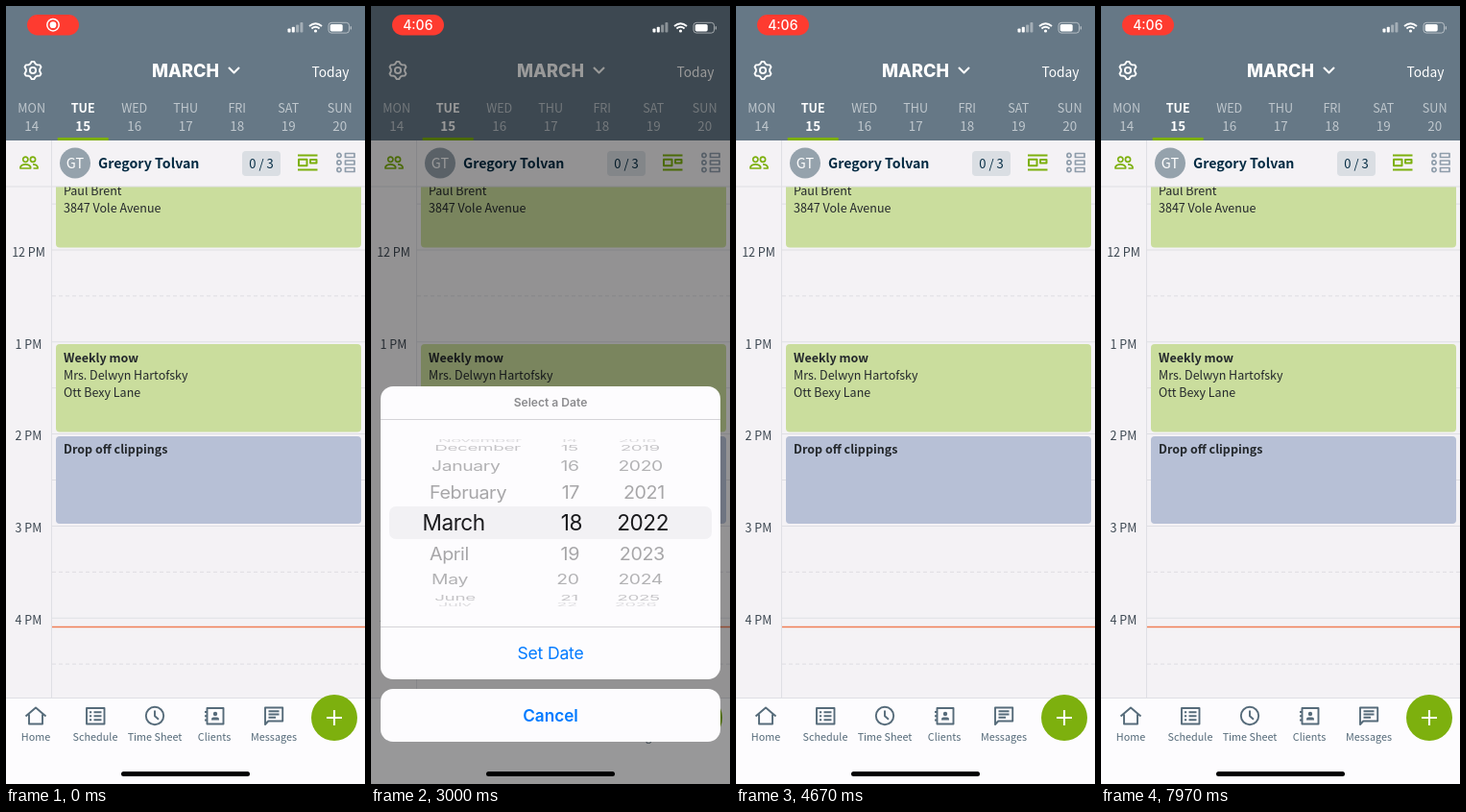
An HTML page with a canvas that plays this animation: 374 px wide and 810 px high, repeating every 8 s.

```html
<!DOCTYPE html>
<html lang="en">
<head>
<meta charset="utf-8">
<title>Schedule date picker</title>
<style>
  html, body { margin: 0; width: 100%; height: 100%; overflow: hidden; background: #f4f2f5; }
  canvas { display: block; width: 374px; height: 810px; }
</style>
</head>
<body>
<canvas id="stage"></canvas>
<script>
const W = 374, H = 810, LOOP = 8000;
const canvas = document.getElementById('stage');
const ratio = window.devicePixelRatio || 1;
canvas.width = W * ratio;
canvas.height = H * ratio;
const ctx = canvas.getContext('2d');

const APP = '"Noto Sans CJK JP", "Noto Sans CJK SC", "Noto Sans CJK", "Noto Sans", sans-serif';
const SYSTEM = 'Inter, "Liberation Sans", sans-serif';
const C = {
  header: '#667886', page: '#f4f2f5', bar: '#fdfcfe', line: '#dfdfe4', green: '#7db00e',
  navy: '#032b43', ink: '#24282c', slate: '#566b7a', muted: '#8f9dab', job: '#cadd9d',
  task: '#b7c0d6', now: '#f07f57', blue: '#007aff', red: '#fe3b30'
};
const DAYS = ['MON', 'TUE', 'WED', 'THU', 'FRI', 'SAT', 'SUN'];
const MONTHS = ['January', 'February', 'March', 'April', 'May', 'June', 'July',
  'August', 'September', 'October', 'November', 'December'];

// Timeline in ms
const T = { clock: 600, open: 1646, spin1: 2540, spin2: 3420, press: 4210, close: 4307,
  pick: 4680, today: 7050 };
const SHEET_TOP = 396, SHEET_TRAVEL = H - SHEET_TOP;

const clamp = v => Math.max(0, Math.min(1, v));
const phase = (t, start, length) => clamp((t - start) / length);
const inOutQuad = u => u < .5 ? 2 * u * u : 1 - 2 * (1 - u) ** 2;
const inOutCubic = u => u < .5 ? 4 * u ** 3 : 1 - 4 * (1 - u) ** 3;

function text(str, x, y, size, color, { weight = 400, align = 'left', font = APP, spacing = 0 } = {}) {
  ctx.font = `${weight} ${size}px ${font}`;
  ctx.letterSpacing = `${spacing}px`;
  ctx.textAlign = align;
  ctx.fillStyle = color;
  ctx.fillText(str, x, y);
}
function rect(x, y, w, h, color, r = 0) {
  ctx.fillStyle = color;
  ctx.beginPath();
  ctx.roundRect(x, y, w, h, r);
  ctx.fill();
}
function disc(x, y, r, color) {
  ctx.fillStyle = color;
  ctx.beginPath();
  ctx.arc(x, y, r, 0, 7);
  ctx.fill();
}
function stroke(d, color, width = 2) {
  ctx.strokeStyle = color;
  ctx.lineWidth = width;
  ctx.stroke(new Path2D(d));
}
function ring(x, y, r, color, width = 2) {
  stroke(`M${x - r} ${y}a${r} ${r} 0 1 0 ${2 * r} 0a${r} ${r} 0 1 0 ${-2 * r} 0Z`, color, width);
}
function clipped(x, y, w, h, draw) {
  ctx.save();
  ctx.beginPath();
  ctx.rect(x, y, w, h);
  ctx.clip();
  draw();
  ctx.restore();
}

// Six teeth, one pointing straight up
function gear(x, y) {
  let d = '';
  for (let i = 0; i < 24; i++) {
    const r = i % 4 < 2 ? 9.2 : 7.2;
    const a = (i - .5) * Math.PI / 12;
    d += `${i ? 'L' : 'M'}${x + r * Math.sin(a)} ${y - r * Math.cos(a)}`;
  }
  stroke(d + 'Z', '#fff', 1.9);
  ring(x, y, 3.1, '#fff', 1.9);
}

function header(selected, scroll) {
  rect(0, 0, W, 140, C.header);
  gear(28, 67);
  text('MARCH', 152, 74, 18.1, '#fff', { weight: 800, font: SYSTEM });
  stroke('M232 64l5.5 5.5l5.5-5.5', '#fff', 2.1);
  text('Today', 357.5, 73.5, 13.8, '#fff', { align: 'right' });
  for (let day = 13; day < 29; day++) {
    const x = 26.7 + (day - 14) * 53.5 - scroll;
    if (x < -30 || x > W + 30) continue;
    const on = day === selected;
    const style = { weight: on ? 700 : 400, align: 'center' };
    const color = on ? '#fff' : '#c0c8ce';
    text(DAYS[day % 7], x, 110.5, 12.6, color, style);
    text(day, x, 129.5, 13.4, color, style);
    if (on) rect(x - 26.5, 137, 53, 3, C.green);
  }
}

function memberRow(badge) {
  rect(0, 140, W, 48, C.page);
  rect(0, 187.5, W, 1, C.line);
  ring(20.3, 159.8, 2.6, C.green, 1.7);
  ring(28, 159.8, 2.6, C.green, 1.7);
  stroke('M15 169v-1.5q1.5-2.6 5.3-2.6t5.3 2.6v1.5ZM28 164.9q3.8 0 5 2.6v1.5h-4.5', C.green, 1.7);
  disc(72, 163.5, 16, '#95a2ac');
  text('GT', 72, 169, 14.5, '#fff', { align: 'center' });
  text('Gregory Tolvan', 96, 168.5, 14.2, C.navy, { weight: 700 });
  const w = badge.length > 1 ? 40 : 23;
  rect(286 - w, 151, w, 26, '#dadee3', 4);
  text(badge, 286 - w / 2, 168.5, 13, C.navy, { align: 'center' });
  stroke('M304 155.5h20.5M304 170.5h20.5M305 159.8h8.5v6.4h-8.5ZM317 160h6.5v3.5h-6.5Z', C.green, 2);
  for (const y of [155.5, 163, 170.5]) {
    ring(347, y, 2.1, C.muted, 1.7);
    stroke(`M353.5 ${y - 2}h9.5v4h-9.5Z`, C.muted, 1.7);
  }
}

function schedule(busy) {
  rect(0, 140, W, 581, C.page);
  clipped(0, 188, W, 532, () => {
    for (let i = 0; i < 6; i++) {
      const y = 254 + 95.8 * i;
      rect(48, y - .5, W, 1, C.line);
      ctx.setLineDash([4, 3]);
      stroke(`M48 ${y - 47.9}H374`, '#dedde2', 1);
      ctx.setLineDash([]);
      text(`${i ? i : 12} PM`, 23.5, y + 6.7, 12.5, '#3b4650', { align: 'center' });
    }
    if (!busy) return;
    const line = (str, y, weight) => text(str, 60, y, 12.5, C.ink, { weight });
    rect(52, 160, 318, 91.5, C.job, 4);
    line('Paul Brent', 196.5);
    line('3847 Vole Avenue', 214.5);
    rect(52, 352, 318, 91.5, C.job, 4);
    line('Weekly mow', 370.5, 700);
    line('Mrs. Delwyn Hartofsky', 388.5);
    line('Ott Bexy Lane', 406.5);
    rect(52, 448, 318, 91, C.task, 4);
    line('Drop off clippings', 466, 700);
    rect(48, 645.8, W, 1.4, C.now);
  });
  rect(47, 140, 1, 581, C.line);
}

function tabBar() {
  rect(0, 720, W, 90, C.bar);
  rect(0, 720, W, 1, C.line);
  const icon = d => stroke(d, C.slate, 1.9);
  icon('M20.5 739.5L31 730.5l10.5 9M24 737.5v10h14v-10');
  icon('M84 731h18.5v16.5H84ZM87 735.3h2.2M91.5 735.3h8M87 739.3h2.2M91.5 739.3h8M87 743.3h2.2M91.5 743.3h8');
  ring(155, 739, 9.2, C.slate, 1.9);
  icon('M155 733.5v5.8l4 3.4');
  icon('M209.5 731h17v16.5h-17ZM207 735h3M207 739.3h3M207 743.5h3');
  disc(218, 737, 2.2, C.slate);
  rect(214, 740.5, 8, 3, C.slate, [2, 2, 0, 0]);
  icon('M270 748v-17.5h18.2v14h-15ZM273.5 734.3h11M273.5 737.5h11M273.5 740.7h7.5');
  ['Home', 'Schedule', 'Time Sheet', 'Clients', 'Messages'].forEach((label, i) =>
    text(label, 31 + 62 * i, 765, 10.8, C.slate, { align: 'center' }));
  disc(342, 741, 24, C.green);
  stroke('M334 741h16M342 733v16', '#fff', 2.1);
}

// Rows lie on a cylinder; the middle band shows them enlarged.
function wheel(cy, day) {
  const columns = [
    { value: 2, edge: 60.3, midEdge: 53.5, align: 'left', label: i => MONTHS[(i + 12) % 12] },
    { value: day, edge: 217.2, midEdge: 220, align: 'right', label: i => i },
    { value: 2022, edge: 306.5, midEdge: 310, align: 'right', label: i => i }
  ];
  const rows = mid => {
    for (const col of columns) {
      const nearest = Math.round(col.value);
      for (let i = nearest - 4; i <= nearest + 4; i++) {
        const angle = (i - col.value) * .3805, cos = Math.cos(angle);
        if (cos < .02 || (mid && Math.abs(i - col.value) > 1.2)) continue;
        const size = mid ? 22.6 : 19.8, scale = 1 - .08 * (1 - cos);
        ctx.save();
        ctx.translate(187, cy + 86 * Math.sin(angle));
        ctx.scale(scale, Math.max(cos, .22));
        text(col.label(i), (mid ? col.midEdge : col.edge) - 187, size * .36, size,
          mid ? '#1b1b1e' : `rgba(30,30,34,${.13 + .28 * cos})`,
          { align: col.align, font: SYSTEM, spacing: -.02 * size });
        ctx.restore();
      }
    }
  };
  clipped(10, cy - 87, 354, 70, () => rows(false));
  clipped(10, cy + 17, 354, 70, () => rows(false));
  clipped(10, cy - 17, 354, 34, () => rows(true));
}

function dateSheet(top, day, pressed) {
  const centered = { align: 'center', font: SYSTEM };
  rect(10, top, 354, 305, '#fdfcfe', 13);
  text('Select a Date', 187, top + 21.2, 12.1, '#8b8b8e', { ...centered, weight: 600 });
  rect(10, top + 34, 354, 1, '#d5d4d8');
  rect(19, top + 125, 336, 34, '#f2f1f4', 7);
  wheel(top + 142, day);
  rect(10, top + 250, 354, 1, '#d5d4d8');
  text('Set Date', 187, top + 284.2, 17.6, pressed ? '#7fbce9' : C.blue, { ...centered, spacing: -.2 });
  rect(10, top + 315, 354, 55, '#fdfcfe', 13);
  text('Cancel', 187, top + 349, 17.2, C.blue, { ...centered, weight: 600 });
}

function statusBar(t) {
  rect(22, 9, 54, 21.5, C.red, 11);
  if (t < T.clock) {
    ring(49, 19.7, 6.2, '#fff', 1.5);
    disc(49, 19.7, 3.4, '#fff');
  } else {
    text('4:06', 48.8, 24.6, 14, '#fff', { weight: 500, align: 'center', font: SYSTEM });
  }
  [4, 5.8, 8, 10.5].forEach((h, i) =>
    rect(293.5 + 4.3 * i, 27.5 - h, 3, h, i < 2 ? '#fff' : 'rgba(255,255,255,.4)', .8));
  stroke('M316 21q6.5-5.6 13 0M318.4 23.4q4.1-3.4 8.2 0', '#fff', 1.9);
  disc(322.5, 26, 1.6, '#fff');
  ctx.strokeStyle = 'rgba(255,255,255,.5)';
  ctx.lineWidth = 1;
  ctx.beginPath();
  ctx.roundRect(336, 17.3, 21.5, 10.8, 3);
  ctx.stroke();
  rect(337.7, 19, 13, 7.4, '#fff', 1.6);
  rect(358.6, 21, 1.4, 3.6, 'rgba(255,255,255,.5)', .7);
}

function frame() {
  const t = performance.now() % LOOP;
  const away = t >= T.pick && t < T.today;
  const scroll = 329 * (inOutCubic(phase(t, T.pick, 320)) - inOutCubic(phase(t, T.today, 320)));
  const shown = inOutQuad(phase(t, T.open, 300)) - inOutQuad(phase(t, T.close, 300));
  const day = 15 + 3 * inOutCubic(phase(t, T.spin1, 420)) + 3 * inOutCubic(phase(t, T.spin2, 500));

  ctx.setTransform(ratio, 0, 0, ratio, 0, 0);
  ctx.lineJoin = 'round';
  schedule(!away);
  header(away ? 21 : 15, scroll);
  memberRow(away ? '0' : '0 / 3');
  rect(47, 140, 1, 48, C.line);
  tabBar();
  if (shown > 0) {
    rect(0, 0, W, H, `rgba(0,0,0,${.4 * shown})`);
    dateSheet(SHEET_TOP + SHEET_TRAVEL * (1 - shown), day, t >= T.press);
  }
  statusBar(t);
  rect(120, 797, 134, 5, '#000', 2.5);
  requestAnimationFrame(frame);
}
frame();
</script>
</body>
</html>
```
